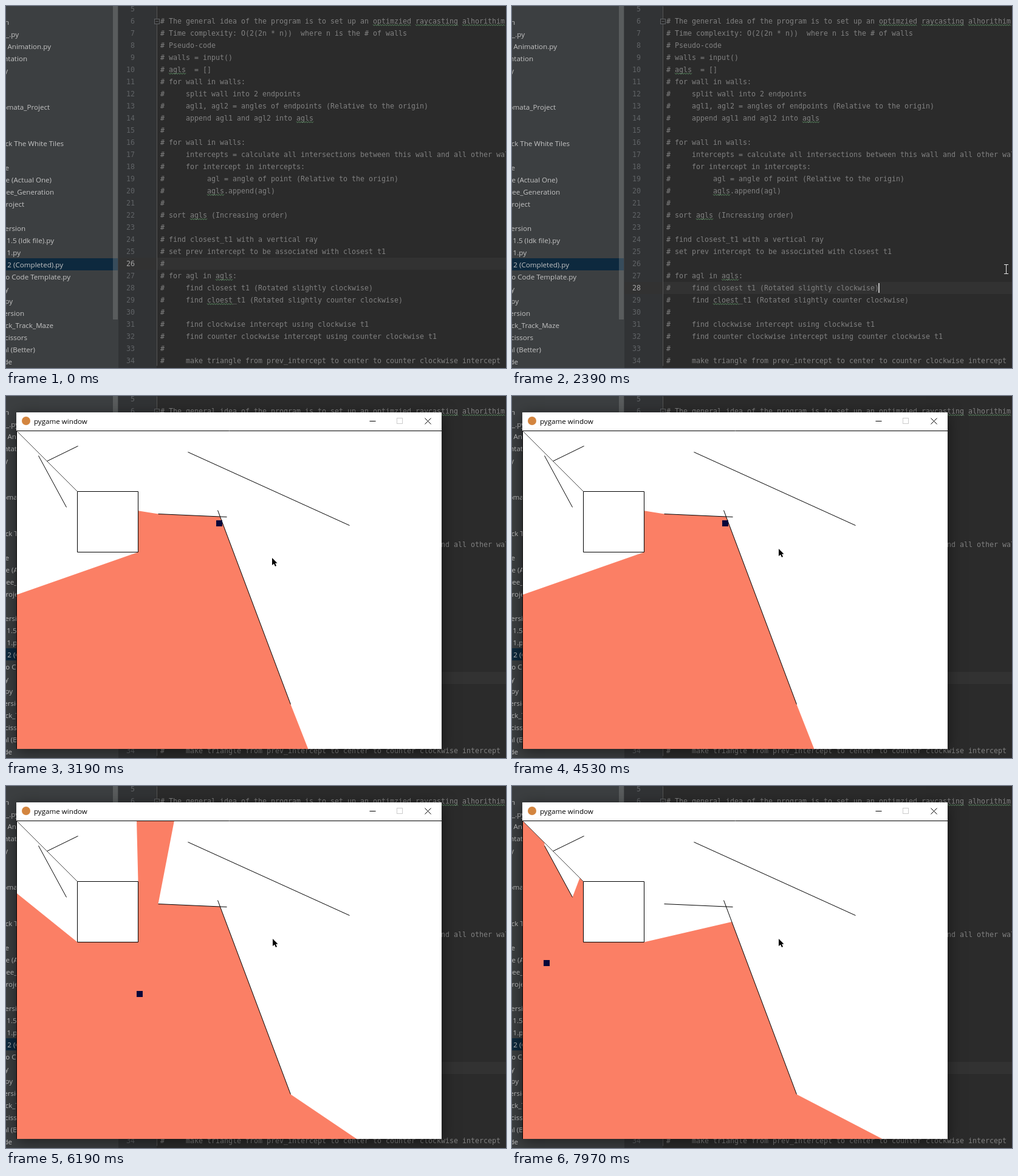
Recreate the animation shown at these times as an HTML page with a canvas. Size 823 by 597 pixels, loop 8 s.

```html
<!DOCTYPE html>
<html lang="en">
<head>
<meta charset="utf-8">
<title>Raycasting</title>
<style>
  html, body { margin: 0; width: 100%; height: 100%; overflow: hidden; background: #2b2b2b; }
  canvas { display: block; }
</style>
</head>
<body>
<canvas id="stage" width="823" height="597"></canvas>
<script>
const ctx = document.getElementById('stage').getContext('2d');
const LOOP = 8000;
const MONO = '11.63px "DejaVu Sans Mono", monospace';
const SANS = '11.6px "Open Sans", sans-serif';

const CODE = `
# The general idea of the program is to set up an optimzied raycasting alhorithim
# Time complexity: O(2(2n * n))  where n is the # of walls
# Pseudo-code
# walls = input()
# agls  = []
# for wall in walls:
#     split wall into 2 endpoints
#     agl1, agl2 = angles of endpoints (Relative to the origin)
#     append agl1 and agl2 into agls
#
# for wall in walls:
#     intercepts = calculate all intersections between this wall and all other walls
#     for intercept in intercepts:
#          agl = angle of point (Relative to the origin)
#          agls.append(agl)
#
# sort agls (Increasing order)
#
# find closest_t1 with a vertical ray
# set prev intercept to be associated with closest t1
#
# for agl in agls:
#     find closest t1 (Rotated slightly clockwise)
#     find cloest_t1 (Rotated slightly counter clockwise)
#
#     find clockwise intercept using clockwise t1
#     find counter clockwise intercept using counter clockwise t1
#
#     make triangle from prev_intercept to center to counter clockwise intercept`.split('\n');
const TYPOS = /optimzied|raycasting|alhorithim|agls|cloest/g;

// [row, right edge, text]
const FILES = [
  [0, 5, 'n'], [1, 21, '_.py'], [2, 74, 'Animation.py'], [3, 35, 'entation'], [4, 3, 'y'],
  [7, 72, 'omata_Project'], [10, 95, 'ick The White Tiles'], [12, 5, 'e'],
  [13, 75, 'e (Actual One)'], [14, 79, 'Tree_Generation'], [15, 30, 'Project'],
  [17, 32, 'Version'], [18, 79, '1.5 (Idk file).py'], [19, 24, '1.py'],
  [20, 94, '2 (Completed).py'], [21, 106, 'o Code Template.py'], [22, 4, 'y'],
  [23, 11, 'py'], [24, 30, 'Version'], [25, 78, 'ck_Track_Maze'], [26, 35, 'cissors'],
  [27, 48, 'al (Better)'], [28, 10, 'de']
];

// x1, y1, x2, y2
const WALLS = [
  [17, 57, 717, 57], [717, 57, 717, 582], [717, 582, 17, 582], [17, 582, 17, 57],
  [18, 58, 117, 157], [67, 107, 118, 82], [53, 98, 99, 183],
  [117, 157, 217, 157], [217, 157, 217, 257], [217, 257, 117, 257], [117, 257, 117, 157],
  [250, 194, 363, 199], [348, 188, 468, 508], [299, 92, 565, 213]
];

// time, x, y
const PATH = [
  [5161, 351, 210], [5176, 351, 212], [6862, 123, 440], [6936, 113, 430],
  [7395, 113, 368], [7822, 57, 312], [8000, 57, 288]
];

const clamp01 = v => Math.max(0, Math.min(1, v));
const mix = (a, b, p) => a + (b - a) * p;
const easeOut = p => 1 - (1 - p) ** 3;
const smooth = p => p * p * (3 - 2 * p);

function rect(x, y, w, h, color) {
  ctx.fillStyle = color;
  ctx.fillRect(x, y, w, h);
}

function line(x1, y1, x2, y2, color) {
  ctx.strokeStyle = color;
  ctx.beginPath();
  ctx.moveTo(x1 + 0.5, y1 + 0.5);
  ctx.lineTo(x2 + 0.5, y2 + 0.5);
  ctx.stroke();
}

function text(str, x, y, color, font, align = 'left') {
  ctx.font = font;
  ctx.textAlign = align;
  ctx.fillStyle = color;
  ctx.fillText(str, x, y);
}

function squiggle(x, y, width) {
  ctx.strokeStyle = '#5f9466';
  ctx.beginPath();
  for (let i = 0; i <= width; i += 2) ctx.lineTo(x + i, y + (i % 4 ? 2 : 0));
  ctx.stroke();
}

function drawSidebar() {
  rect(0, 0, 185, 597, '#3c3f41');
  rect(0, 416, 184, 20, '#0d293e');
  for (const [row, right, name] of FILES) {
    text(name, right, 31 + row * 20, '#c4c4c4', SANS, 'right');
  }
  rect(176, 0, 8, 517, 'rgba(166,166,166,0.28)');
}

function drawEditor(t) {
  const current = t < 310 ? 26 : 28;
  rect(185, 0, 638, 597, '#2b2b2b');
  rect(185, 0, 63, 597, '#313335');
  rect(185, 15 + (current - 6) * 20, 638, 20, '#323232');
  line(248, 0, 248, 593, '#555555');
  CODE.forEach((row, i) => {
    const y = 9 + i * 20;
    const number = i + 5;
    text(number, 212, y, number === current ? '#a4a3a3' : '#606366', MONO, 'right');
    text(row, 254, y, '#808080', MONO);
    for (const typo of row.matchAll(TYPOS)) {
      squiggle(254 + typo.index * 7, y + 1.5, typo[0].length * 7);
    }
  });
  rect(244, 21, 9, 9, '#2b2b2b');
  ctx.strokeStyle = '#606366';
  ctx.strokeRect(244.5, 21.5, 8, 8);
  line(246, 25, 250, 25, '#606366');
  if ((t >= 310 && t < 770) || (t >= 1880 && t < 2400)) rect(603, 457, 2, 16, '#bbbbbb');
}

// Distance along the ray and position along the wall
function intersect(ox, oy, dx, dy, [x1, y1, x2, y2]) {
  const wx = x2 - x1, wy = y2 - y1;
  const det = dx * wy - dy * wx;
  if (Math.abs(det) < 1e-9) return null;
  return {
    ray: ((x1 - ox) * wy - (y1 - oy) * wx) / det,
    wall: ((x1 - ox) * dy - (y1 - oy) * dx) / det
  };
}

const inside = v => v > -1e-6 && v < 1 + 1e-6;

const CORNERS = WALLS.flatMap(([x1, y1, x2, y2], i) => {
  const points = [[x1, y1], [x2, y2]];
  for (const other of WALLS.slice(i + 1)) {
    const hit = intersect(x1, y1, x2 - x1, y2 - y1, other);
    if (hit && inside(hit.ray) && inside(hit.wall)) {
      points.push([mix(x1, x2, hit.ray), mix(y1, y2, hit.ray)]);
    }
  }
  return points;
});

function castRay(ox, oy, angle) {
  const dx = Math.cos(angle), dy = Math.sin(angle);
  let nearest = 2000;
  for (const wall of WALLS) {
    const hit = intersect(ox, oy, dx, dy, wall);
    if (hit && hit.ray > 0 && inside(hit.wall)) nearest = Math.min(nearest, hit.ray);
  }
  return [ox + dx * nearest, oy + dy * nearest];
}

function drawLight([ox, oy]) {
  const angles = CORNERS.flatMap(([x, y]) => {
    const a = Math.atan2(y - oy, x - ox);
    return [a - 1e-4, a, a + 1e-4];
  }).sort((a, b) => a - b);
  ctx.fillStyle = '#fb7f65';
  ctx.beginPath();
  for (const a of angles) {
    const [x, y] = castRay(ox, oy, a);
    ctx.lineTo(x + 0.5, y + 0.5);
  }
  ctx.fill();
}

function playerAt(t) {
  if (t <= PATH[0][0]) return PATH[0].slice(1);
  const i = Math.max(1, PATH.findIndex(key => key[0] >= t));
  const [t0, x0, y0] = PATH[i - 1], [t1, x1, y1] = PATH[i];
  const p = (t - t0) / (t1 - t0);
  return [mix(x0, x1, p), mix(y0, y1, p)];
}

// The screen refreshes in bursts of 18 short steps
function captureTime(t) {
  const start = [7670, 6850, 6010, 5190].find(s => t >= s);
  if (!start) return 0;
  const step = start === 7670 ? 50 : 46;
  return start + step * Math.min(17, Math.floor((t - start) / step));
}

function drawGame(t) {
  const now = captureTime(t);
  rect(17, 57, 700, 525, '#ffffff');
  ctx.save();
  ctx.beginPath();
  ctx.rect(17, 57, 700, 525);
  ctx.clip();
  drawLight(playerAt(now - 15));
  WALLS.forEach((wall, i) => line(...wall, i === 4 ? '#4a4a4a' : '#000000'));
  const [x, y] = playerAt(now);
  rect(Math.round(x) - 5, Math.round(y) - 5, 10, 10, '#04083a');
  ctx.restore();
}

function drawTitleBar(ready) {
  rect(17, 27, 700, 30, '#ffffff');
  if (ready) {
    ctx.fillStyle = '#d3853f';
    ctx.beginPath();
    ctx.arc(33, 41, 7, 0, Math.PI * 2);
    ctx.fill();
  } else {
    rect(26, 36, 14, 11, '#8a9a9c');
  }
  text('pygame window', 46, 46, '#000000', SANS);
  line(598, 41, 608, 41, '#000000');
  ctx.strokeStyle = '#cccccc';
  ctx.strokeRect(643.5, 36.5, 9, 9);
  line(689, 36, 699, 46, '#000000');
  line(699, 36, 689, 46, '#000000');
}

// Falls only outside the window, so a translucent window is not darkened
function drawShadow(strength) {
  ctx.save();
  ctx.beginPath();
  ctx.rect(-50, -50, 950, 750);
  ctx.rect(17, 27, 700, 555);
  ctx.clip('evenodd');
  ctx.shadowColor = `rgba(0,0,0,${strength})`;
  ctx.shadowBlur = 24;
  ctx.shadowOffsetY = 5;
  rect(17, 27, 700, 555, '#000000');
  ctx.restore();
}

function drawWindow(t) {
  if (t < 2420) return;
  const frame = Math.floor((t - 20) / 50) * 50 + 20;
  const shown = easeOut(clamp01((frame - 2400) / 204));
  const scale = 0.94 + 0.06 * shown;
  const ready = t >= 2670;
  ctx.save();
  ctx.translate(367, 304.5);
  ctx.scale(scale, scale);
  ctx.translate(-367, -304.5);
  ctx.globalAlpha = shown;
  drawShadow(ready ? 0.5 : 0.15);
  rect(17, 27, 700, 555, '#000000');
  drawTitleBar(ready);
  if (ready) drawGame(t);
  ctx.restore();
}

function drawArrow(x, y) {
  const shape = [[0, 0], [0, 12], [3, 9.5], [5, 14], [7, 13], [5, 8.8], [8.5, 8.5]];
  ctx.beginPath();
  for (const [dx, dy] of shape) ctx.lineTo(x + dx, y + dy);
  ctx.closePath();
  ctx.strokeStyle = '#ffffff';
  ctx.stroke();
  ctx.fillStyle = '#000000';
  ctx.fill();
}

function drawBeam(x, y) {
  rect(x, y - 7, 1, 15, '#e8e8e8');
  rect(x - 3, y - 8, 7, 1, '#e8e8e8');
  rect(x - 3, y + 7, 7, 1, '#e8e8e8');
}

function drawPointer(t) {
  if (t < 2180) return;
  const enter = clamp01((Math.floor((t - 2180) / 50) + 1) / 4);
  const cross = smooth(clamp01((Math.floor((t - 2880) / 44) + 1) / 8));
  const nudge = clamp01((Math.floor((t - 4450) / 40) + 1) / 3);
  const x = Math.round(mix(mix(826, 813, enter), 438, cross) + nudge);
  const y = Math.round(mix(434, 267, cross) - 15 * nudge);
  if (x > 717) drawBeam(x, y);
  else drawArrow(x, y);
}

function draw() {
  const t = performance.now() % LOOP;
  ctx.lineWidth = 1;
  drawEditor(t);
  drawSidebar();
  drawWindow(t);
  drawPointer(t);
  requestAnimationFrame(draw);
}
draw();
</script>
</body>
</html>
```
